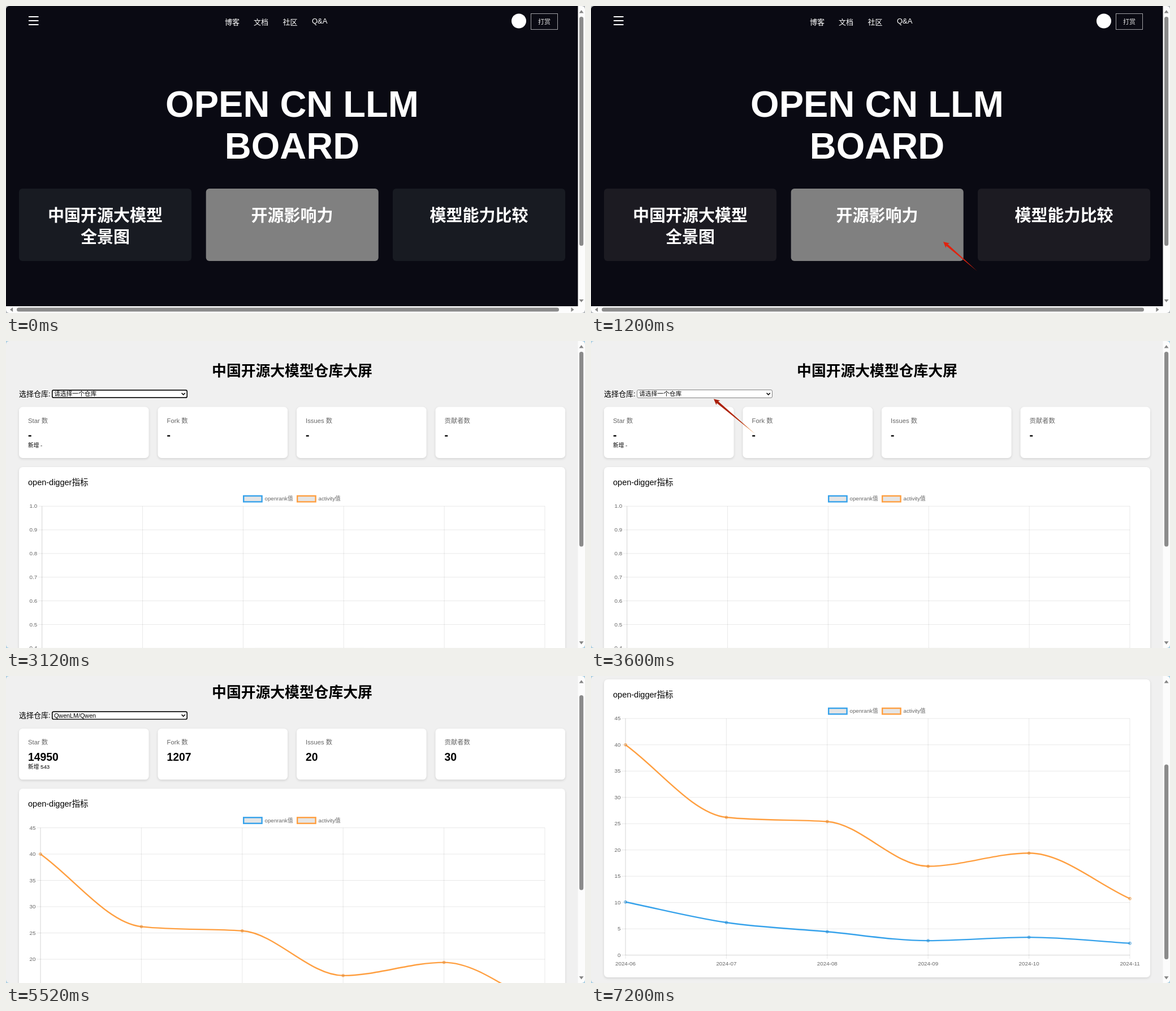
Write an HTML page with a canvas that moves like this. It is 1024 by 543 pixels and loops after 8400 ms.

```html
<!DOCTYPE html>
<html lang="zh-CN">
<head>
<meta charset="utf-8">
<title>Board</title>
<style>
  html, body { margin: 0; width: 100%; height: 100%; overflow: hidden; }
  canvas { display: block; }
</style>
</head>
<body>
<canvas id="stage" width="1024" height="543"></canvas>
<script>
const ctx = document.getElementById('stage').getContext('2d');
const W = 1024, H = 543, STEP = 1200;
const FONT = '"Liberation Sans", "Noto Sans CJK SC", "Noto Sans CJK", sans-serif';
const BLUE = '#36a2eb', ORANGE = '#ff9f40';
const GRID = 'rgba(0,0,0,0.1)';

const months = ['2024-06', '2024-07', '2024-08', '2024-09', '2024-10', '2024-11'];
const activity = [40, 26.2, 25.4, 16.9, 19.4, 10.75];
const openrank = [10.1, 6.2, 4.45, 2.75, 3.4, 2.25];

function text(str, x, baseline, size, color = '#000', align = 'left', weight = 'normal') {
  ctx.font = `${weight} ${size}px ${FONT}`;
  ctx.textAlign = align;
  ctx.fillStyle = color;
  ctx.fillText(str, x, baseline);
}

function rect(x, y, w, h, color) {
  ctx.fillStyle = color;
  ctx.fillRect(x, y, w, h);
}

function roundRect(x, y, w, h, r, color) {
  ctx.beginPath();
  ctx.roundRect(x, y, w, h, r);
  ctx.fillStyle = color;
  ctx.fill();
}

function polygon(points, color) {
  ctx.beginPath();
  points.forEach(([x, y]) => ctx.lineTo(x, y));
  ctx.closePath();
  ctx.fillStyle = color;
  ctx.fill();
}

function line(x1, y1, x2, y2, color, width = 0.9) {
  ctx.beginPath();
  ctx.moveTo(x1, y1);
  ctx.lineTo(x2, y2);
  ctx.strokeStyle = color;
  ctx.lineWidth = width;
  ctx.stroke();
}

function circle(x, y, r) {
  ctx.beginPath();
  ctx.arc(x, y, r, 0, Math.PI * 2);
}

function whiteCard(x, y, w, h) {
  ctx.save();
  ctx.shadowColor = 'rgba(0,0,0,0.13)';
  ctx.shadowBlur = 4;
  ctx.shadowOffsetY = 1.6;
  roundRect(x, y, w, h, 6.5, '#fff');
  ctx.restore();
}

// Small scrollbar triangle pointing along (dx, dy).
function scrollArrow(x, y, dx, dy) {
  const tip = 2.6, half = 4;
  polygon([
    [x + dx * tip, y + dy * tip],
    [x - dx * tip - dy * half, y - dy * tip + dx * half],
    [x - dx * tip + dy * half, y - dy * tip - dx * half]
  ], '#858585');
}

function verticalScrollbar(top, bottom, arrowY) {
  rect(1011.5, 0, 12.5, H, '#fcfcfc');
  roundRect(1014, top, 7.2, bottom - top, 3.6, '#8b8b8b');
  scrollArrow(1017.6, 9.8, 0, -1);
  scrollArrow(1017.6, arrowY, 0, 1);
}

// Tapered pointer: barbed head at the tip, shaft narrowing towards the tail.
function pointer(tipX, tipY, tailX, tailY, color) {
  const length = Math.hypot(tailX - tipX, tailY - tipY);
  ctx.save();
  ctx.translate(tipX, tipY);
  ctx.rotate(Math.atan2(tailY - tipY, tailX - tipX));
  polygon([[0, 0], [10.5, -5.3], [8.8, -2], [length, 0], [8.8, 2], [10.5, 5.3]], color);
  ctx.restore();
}

function roundedCorners(color) {
  ctx.beginPath();
  ctx.rect(0, 0, W, H);
  ctx.roundRect(0, 0, W, H, 6);
  ctx.fillStyle = color;
  ctx.fill('evenodd');
}

function drawHome(sideCard) {
  rect(0, 0, W, H, '#0a0a13');
  [19, 26, 33].forEach(y => rect(40, y - 1, 17.5, 2, '#fff'));
  text('博客', 387, 33, 13, '#fff');
  text('文档', 438, 33, 13, '#fff');
  text('社区', 489.5, 33, 13, '#fff');
  text('Q&A', 541, 31.3, 13, '#fff');

  circle(907, 26.5, 13);
  ctx.fillStyle = '#fff';
  ctx.fill();
  ctx.strokeStyle = '#a0a0a4';
  ctx.lineWidth = 1;
  ctx.strokeRect(928.5, 13.5, 47, 28);
  text('打赏', 952, 32, 11, '#e8e8e8', 'center');

  text('OPEN CN LLM', 506, 196, 65, '#fff', 'center', 'bold');
  text('BOARD', 506, 270, 65, '#fff', 'center', 'bold');

  [[23, sideCard], [353.7, '#808080'], [684, sideCard]]
    .forEach(([x, color]) => roundRect(x, 323, 305, 128, 6, color));
  const heading = (str, x, y) => text(str, x, y, 29, '#fff', 'center', 'bold');
  heading('中国开源大模型', 175.5, 381);
  heading('全景图', 175.5, 419);
  heading('开源影响力', 506, 381);
  heading('模型能力比较', 836.5, 381);

  verticalScrollbar(19, 424, 521.5);
  rect(0, 531, W, 12, '#fcfcfc');
  roundRect(19, 533.4, 959, 7.2, 3.6, '#8b8b8b');
  scrollArrow(9.5, 537, -1, 0);
  scrollArrow(1002, 537, 1, 0);
  roundedCorners('#b4b8bc');
}

function drawSelect(y, label, focused) {
  text('选择仓库:', 23, y + 11.8, 13);
  ctx.beginPath();
  const inset = focused ? 0.8 : 0.5;
  ctx.roundRect(81 + inset, y + inset, 240 - 2 * inset, 15 - 2 * inset, 2.5);
  ctx.fillStyle = '#fff';
  ctx.fill();
  ctx.strokeStyle = focused ? '#101010' : '#767676';
  ctx.lineWidth = focused ? 1.7 : 0.9;
  ctx.stroke();
  text(label, 85, y + 11.4, 10.75);
  ctx.beginPath();
  ctx.moveTo(310.6, y + 6);
  ctx.lineTo(313.7, y + 9.1);
  ctx.lineTo(316.8, y + 6);
  ctx.strokeStyle = '#000';
  ctx.lineWidth = 1.5;
  ctx.stroke();
}

// Monotone cubic tangents, limited so the curve never overshoots its points.
function monotoneSlopes(points) {
  const secants = points.slice(1).map(([x, y], i) => (y - points[i][1]) / (x - points[i][0]));
  const last = secants.length;
  const slopes = points.map((_, i) => {
    if (i === 0) return secants[0];
    if (i === last) return secants[last - 1];
    const a = secants[i - 1], b = secants[i];
    return a * b <= 0 ? 0 : (a + b) / 2;
  });
  secants.forEach((secant, i) => {
    const size = Math.hypot(slopes[i] / secant, slopes[i + 1] / secant);
    if (size <= 3) return;
    slopes[i] *= 3 / size;
    slopes[i + 1] *= 3 / size;
  });
  return slopes;
}

function drawSeries(points, color) {
  const slopes = monotoneSlopes(points);
  ctx.beginPath();
  ctx.moveTo(...points[0]);
  for (let i = 1; i < points.length; i++) {
    const [x0, y0] = points[i - 1], [x1, y1] = points[i];
    const third = (x1 - x0) / 3;
    ctx.bezierCurveTo(x0 + third, y0 + slopes[i - 1] * third,
      x1 - third, y1 - slopes[i] * third, x1, y1);
  }
  ctx.strokeStyle = color;
  ctx.lineWidth = 2.4;
  ctx.stroke();
  points.forEach(([x, y]) => {
    circle(x, y, 2.4);
    ctx.fillStyle = GRID;
    ctx.fill();
    ctx.lineWidth = 0.9;
    ctx.stroke();
  });
}

function legendItem(x, y, label, color) {
  ctx.fillStyle = '#e5e5e5';
  ctx.fillRect(x + 1.2, y - 5.2, 32.4, 10.4);
  ctx.strokeStyle = color;
  ctx.lineWidth = 2.4;
  ctx.strokeRect(x + 1.2, y - 5.2, 32.4, 10.4);
  text(label, x + 38.5, y + 3.2, 9.7, '#666');
}

function drawChart(top, loaded) {
  const left = loaded ? 61 : 63.7, right = 953, height = 418.5;
  const rows = loaded ? 9 : 10;
  const bottom = top + height;
  const columnX = i => left + (right - left) * i / 5;

  for (let i = 0; i <= rows; i++) {
    const y = top + height * i / rows;
    const label = loaded ? String(45 - 5 * i) : (1 - i / 10).toFixed(1);
    line(left - 6.5, y, right, y, GRID);
    text(label, left - 8.5, y + 3.1, 9.8, '#666', 'right');
  }
  months.forEach((month, i) => {
    const x = columnX(i);
    line(x, top, x, bottom + 6.5, GRID);
    if (loaded) text(month, x, bottom + 17.8, 9.8, '#666', 'center');
  });
  line(left, top, left, bottom, GRID);
  line(left, bottom, right, bottom, GRID);

  if (!loaded) return;
  const toPoints = values => values.map((v, i) => [columnX(i), bottom - v / 45 * height]);
  drawSeries(toPoints(activity), ORANGE);
  drawSeries(toPoints(openrank), BLUE);
}

function drawDashboard({ scroll, loaded, focused, thumb }) {
  rect(0, 0, W, H, '#f0f0f0');
  text('中国开源大模型仓库大屏', 506, 61.5 - scroll, 25.8, '#000', 'center', 'bold');
  drawSelect(86 - scroll, loaded ? 'QwenLM/Qwen' : '请选择一个仓库', focused);

  const cardTop = 116.6 - scroll;
  const stats = [['Star 数', 14950], ['Fork 数', 1207], ['Issues 数', 20], ['贡献者数', 30]];
  stats.forEach(([label, value], i) => {
    const x = 23 + 245.5 * i;
    whiteCard(x, cardTop, 229.6, 90.4);
    text(label, x + 16, cardTop + 28.2, 11.3, '#666');
    text(loaded ? value : '-', x + 16, cardTop + 56.6, 19.35, '#000', 'left', 'bold');
  });
  text(loaded ? '新增 543' : '新增 -', 39, cardTop + 71.4, 9.7);

  const panelTop = 223 - scroll;
  whiteCard(23, panelTop, 966, 527);
  text('open-digger指标', 39, panelTop + 32, 14.5);
  legendItem(419, panelTop + 56.2, 'openrank值', BLUE);
  legendItem(514, panelTop + 56.2, 'activity值', ORANGE);
  drawChart(panelTop + 69.2, loaded);

  verticalScrollbar(thumb, thumb + 344.5, 533.8);
  roundedCorners('#a9cfe3');
}

function drawSelectPointer() {
  const fade = ctx.createLinearGradient(0, 0, 96, 0);
  fade.addColorStop(0, '#a81c08');
  fade.addColorStop(0.65, '#b52c0c');
  fade.addColorStop(1, '#f0a040');
  pointer(217, 102.5, 291, 165, fade);
}

const scenes = [
  () => drawHome('#181b22'),
  () => { drawHome('#1c1b22'); pointer(623, 417, 683, 469, '#e0220f'); },
  () => drawDashboard({ scroll: 0, loaded: false, focused: true, thumb: 19 }),
  () => { drawDashboard({ scroll: 0, loaded: false, focused: false, thumb: 19 }); drawSelectPointer(); },
  () => drawDashboard({ scroll: 23.7, loaded: true, focused: true, thumb: 34 }),
  () => drawDashboard({ scroll: 77.4, loaded: true, focused: false, thumb: 68 }),
  () => drawDashboard({ scroll: 217, loaded: true, focused: false, thumb: 156.5 })
];

const start = performance.now();
function render() {
  const elapsed = performance.now() - start;
  scenes[Math.floor(elapsed / STEP) % scenes.length]();
  requestAnimationFrame(render);
}
render();
</script>
</body>
</html>
```
